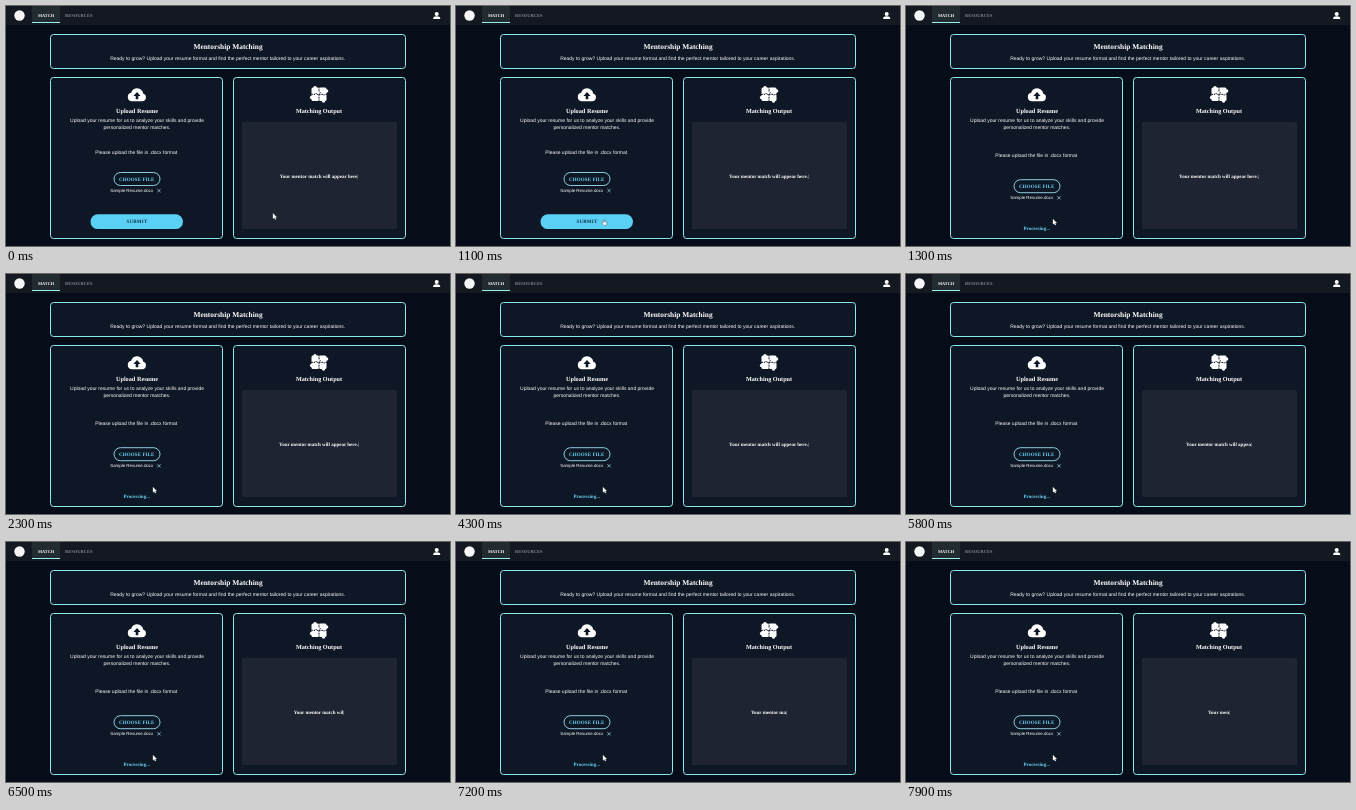
An HTML page for the animation above (8 s loop, 444 by 240 pixels).

```html
<!DOCTYPE html>
<html lang="en">
<head>
<meta charset="utf-8">
<title>Mentorship Matching</title>
<style>
  html, body { margin: 0; width: 100%; height: 100%; overflow: hidden; background: #060c18; }
  svg { display: block; width: 444px; height: 240px; }
  text { text-anchor: middle; text-rendering: geometricPrecision; fill: #fff; white-space: pre; }
  .serif { font: bold 5px "Liberation Serif", serif; }
  .sans { font: 5px "Liberation Sans", sans-serif; }
  .card { fill: #0e1725; stroke: #8ceaec; }
  .cyan { fill: #69d3f4; }
</style>
</head>
<body>
<svg viewBox="0 0 444 240">
  <rect width="444" height="19" fill="#131821"/>
  <rect x="26" width="28" height="17" fill="#222b30"/>
  <rect x="26" y="16" width="28" height="1" fill="#94efe6"/>
  <circle cx="13.5" cy="9.5" r="5.2" fill="#f4f6f8"/>
  <text class="serif" x="40" y="11" style="font-size:4.3px">MATCH</text>
  <text class="serif" x="72.7" y="11" style="font-size:4.5px;fill:#7d858f">RESOURCES</text>
  <g fill="#fff">
    <circle cx="430.7" cy="8" r="2"/>
    <path d="M427.200 13V12.200q0-2 3.500-2t3.500 2V13z"/>
  </g>

  <rect class="card" x="44.5" y="28.5" width="355" height="34" rx="3"/>
  <text class="serif" x="222" y="42.8" style="font-size:7.4px">Mentorship Matching</text>
  <text class="sans" x="221.7" y="53.7">Ready to grow? Upload your resume format and find the perfect mentor tailored to your career aspirations.</text>

  <rect class="card" x="44.5" y="71.500" width="172" height="161" rx="3"/>
  <path fill="#fff" d="M126 95.300a4.300 4.300 0 0 1-.8-8.500a6 6 0 0 1 10-2.800a4 4 0 0 1 1.900 3.500a4 4 0 0 1-.8 7.800z"/>
  <path fill="#0e1725" d="M131 86l3.600 3.900h-2.300v3.400h-2.600v-3.400h-2.300z"/>
  <text class="serif" x="131" y="107" style="font-size:6.25px">Upload Resume</text>
  <text class="sans" x="131" y="115.7">Upload your resume for us to analyze your skills and provide</text>
  <text class="sans" x="131" y="122.8">personalized mentor matches.</text>
  <text class="sans" id="hint" x="130.2" y="147.6">Please upload the file in .docx format</text>
  <g id="picker">
    <rect x="108" y="166.5" width="46" height="13" rx="6.5" fill="#0e1725" stroke="#9ce0f0" stroke-width=".9"/>
    <text class="serif cyan" x="130.8" y="174.8" letter-spacing=".1">CHOOSE FILE</text>
    <text class="sans" x="125.7" y="186.2" style="font-size:4.4px">Sample Resume.docx</text>
    <path d="M151.4 183l3.2 3.2m0-3.2l-3.2 3.2" stroke="#b4dfea" stroke-width=".7"/>
  </g>
  <g id="submit">
    <rect x="84.5" y="208.3" width="92.5" height="14.8" rx="7.4" fill="#5bd0f5"/>
    <text class="serif" x="131" y="217.4" letter-spacing=".2" style="fill:#12334a">SUBMIT</text>
  </g>
  <text class="serif cyan" id="busy" x="130.7" y="224">Processing...</text>

  <rect class="card" x="227.5" y="71.5" width="172" height="161" rx="3"/>
  <g fill="#fff">
    <rect x="305.5" y="81.5" width="15" height="13.5" rx="1.5"/>
    <circle cx="309" cy="81.8" r="1.7"/>
    <circle cx="317.5" cy="95" r="1.7"/>
    <circle cx="305.7" cy="91.5" r="1.8"/>
    <circle cx="320.5" cy="85" r="1.8"/>
  </g>
  <path d="M313 80.500v5q2.500 1 0 2.500v8M305 88.300h4q1-2 2 0h6q1 2 2 0h2" fill="none" stroke="#0e1725" stroke-width="1" stroke-dasharray="2 .8"/>
  <text class="serif" x="313" y="107" style="font-size:6.2px">Matching Output</text>
  <rect x="236" y="116" width="155" height="107" rx="1.5" fill="#1f2432"/>
  <text class="serif" x="313" y="171.5"><tspan id="output"></tspan><tspan font-weight="400">|</tspan></text>

  <g id="pointer" stroke-linejoin="round">
    <path id="arrow" d="M0 0v5l1.200-1l.9 1.900l.9-.4l-.9-1.800h1.600z" fill="#fff" stroke="#fff" stroke-width=".3"/>
    <path id="hand" d="M.3 3.500V.6q.6-.8 1.200 0v1.700l2.300.7v1.700l-.7 1.500h-2.200l-1.900-2.200q.3-.8 1.300-.5z" fill="#fff" stroke="#222" stroke-width=".4"/>
  </g>
</svg>
<script>
  const LOOP = 8000, MOVE_END = 900, SUBMITTED = 1200;
  const ERASE_START = 5150, ERASE_STEP = 102;
  const MESSAGE = "Your mentor match will appear here.";
  const $ = id => document.getElementById(id);
  const show = (id, on) => $(id).setAttribute("visibility", on ? "visible" : "hidden");
  const shift = (id, x, y) => $(id).setAttribute("transform", `translate(${x} ${y})`);

  function visibleLetters(t) {
    if (t < 100) return MESSAGE.length - 1;
    if (t < ERASE_START) return MESSAGE.length;
    return MESSAGE.length - 1 - Math.floor((t - ERASE_START) / ERASE_STEP);
  }

  function draw() {
    const t = performance.now() % LOOP, busy = t >= SUBMITTED;

    const p = Math.min(1, t / MOVE_END);
    const ease = p * p * (3 - 2 * p);
    const x = 267 - 120 * ease, y = 207.5 + 5.7 * ease;
    const hovering = !busy && x < 177;
    shift("pointer", x, y);
    show("hand", hovering);
    show("arrow", !hovering);

    show("submit", !busy);
    show("busy", busy);
    shift("hint", 0, busy ? 3.3 : 0);
    shift("picker", 0, busy ? 7.2 : 0);
    $("output").textContent = MESSAGE.slice(0, visibleLetters(t));
    requestAnimationFrame(draw);
  }
  draw();
</script>
</body>
</html>
```
